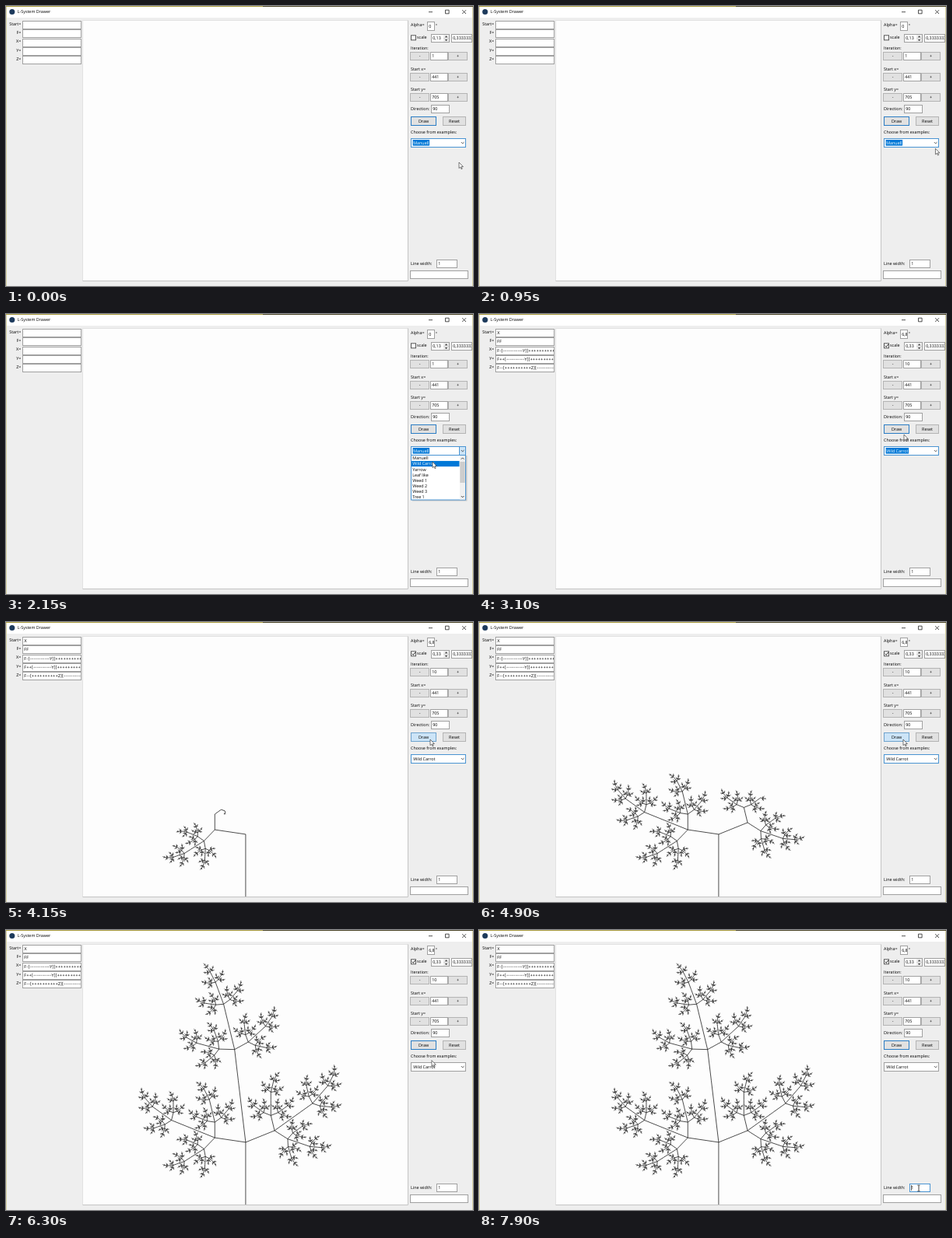
Write an HTML page with a canvas that moves like this. It is 600 px wide and 360 px high and loops after 8 s.

```html
<!DOCTYPE html>
<html lang="en">
<head>
<meta charset="utf-8">
<title>L-System Drawer</title>
<style>
  html, body { margin: 0; width: 100%; height: 100%; overflow: hidden; background: #eee; }
  canvas, body > svg { position: absolute; left: 0; top: 0; width: 600px; height: 360px; }
  text { font: 5.4px "Open Sans", "Noto Sans", sans-serif; fill: #000; white-space: pre;
    text-rendering: geometricPrecision; }
  .rule { font: 5.15px Inter, sans-serif; }
  .mid { text-anchor: middle; }
  .end { text-anchor: end; }
</style>
</head>
<body>
<canvas id="plant" width="600" height="360"></canvas>
<svg id="ui" viewBox="0 0 600 360"></svg>
<script>
const LOOP = 8000, STEP = 50;
const BLUE = '#0078d7', FOCUS = '#4a94d2', EDGE = '#a0a0a0';
const ui = document.getElementById('ui');

function add(tag, attrs, parent = ui, content = '') {
  const el = document.createElementNS('http://www.w3.org/2000/svg', tag);
  for (const key in attrs) el.setAttribute(key, attrs[key]);
  el.textContent = content;
  parent.append(el);
  return el;
}
const set = (el, attrs) => { for (const key in attrs) el.setAttribute(key, attrs[key]); };
const show = (el, on) => el.setAttribute('visibility', on ? 'visible' : 'hidden');
const write = (el, value) => { if (el.textContent !== value) el.textContent = value; };
const rect = (x, y, width, height, fill, stroke = 'none', parent = ui) =>
  add('rect', { x, y, width, height, fill, stroke }, parent);
const label = (x, y, value, cls = '', parent = ui) => add('text', { x, y, class: cls }, parent, value);
const line = (d, stroke = '#222', width = 0.8, parent = ui) =>
  add('path', { d, stroke, 'stroke-width': width, fill: 'none' }, parent);

function field(x, y, w, h, value, cls = '') {
  const box = rect(x + .5, y + .5, w - 1, h - 1, '#fff', EDGE);
  const inner = add('svg', { x: x + 1, y, width: w - 2, height: h });
  return { box, text: label(1.2, h / 2 + 1.5, value, cls, inner) };
}
function button(x, y, w, h, value) {
  const box = rect(x + .5, y + .5, w - 1, h - 1, '#e1e1e1', '#b4b4b4');
  label(x + w / 2, y + h / 2 + 1.8, value, 'mid');
  return box;
}
function stepper(y, value) {
  button(519, y, 25, 11, '-');
  button(568, y, 25, 11, '+');
  return field(545, y, 23, 11, value);
}

// Window frame and title bar
rect(0, 0, 600, 15, '#fff');
rect(0, 0, 330, 1, '#a89a3c');
rect(330, 0, 270, 1, '#4a4426');
rect(0, 1, 1, 359, '#d9d3a4');
rect(599, 1, 1, 359, '#d9d3a4');
add('circle', { cx: 7.8, cy: 7.5, r: 3.5, fill: '#1d3a5c' });
label(14.7, 9.4, 'L-System Drawer');
line('M543 7.7h5M564.5 5.2h4.6v4.6h-4.6zM586.2 5.2l4.8 4.8m0-4.8l-4.8 4.8');
line('M98.5 353.5V18.5H516.5', '#e2e2e2', 1);
line('M98.5 353.5H516.5V18.5', '#c4c4c4', 1);

// Left panel
const ruleText = ['Start', 'F', 'X', 'Y', 'Z'].map((name, i) => {
  const y = 19 + i * 11.3;
  label(19.3, y + 5.8, name + '=', 'end');
  return field(21, Math.round(y), 76, 11, '', 'rule').text;
});
const rules = ['X', 'FF',
  `F-[${'-'.repeat(11)}Y][${'+'.repeat(11)}Z]FX`,
  `F++[${'-'.repeat(10)}Y][${'+'.repeat(10)}Z]FY`,
  `F--[${'+'.repeat(10)}Z][${'-'.repeat(10)}Y]FZ`];

// Right panel
label(520, 26.1, 'Alpha=');
const alpha = field(541, 20, 10, 12, '0').text;
label(551.7, 26.6, '°');
rect(520.5, 37.8, 6, 6, '#fff', '#555');
const tick = line('M521.8 40.8l1.5 1.6 2.4-3.4', '#111', 0.9);
label(528, 42.3, 'scale');
const scale = field(546, 36, 24, 11, '').text;
rect(562, 37, 7, 9, '#ececec');
line('M562 41.5h7', '#c8c8c8', 0.7);
add('path', { d: 'M563.9 40.2h3.4l-1.7-2zM563.9 43h3.4l-1.7 2z', fill: '#333' });
field(572, 36, 27, 11, '0,3333333');
label(520, 56, 'Iteration:');
const iteration = stepper(59, '1').text;
label(520, 82.7, 'Start x=');
stepper(86, '441');
label(520, 109, 'Start y=');
stepper(112, '705');
label(520, 133.6, 'Direction:');
field(546, 127, 24, 11, '90');
const draw = button(520, 142, 33, 12, 'Draw');
button(561, 142, 30, 12, 'Reset');
label(520, 164.1, 'Choose from examples:');
const combo = rect(520.5, 170.5, 70, 11, '#fff', FOCUS);
const comboMark = rect(522.6, 172, 22, 7.6, BLUE);
const comboArrowBox = rect(582.5, 170.5, 8, 11, '#cce4f7', FOCUS);
line('M584.8 175l1.9 1.9 1.9-1.9', '#333');
const comboText = label(523.2, 177.6, 'Manuell');
label(520, 333.3, 'Line width:');
const widthField = field(553, 326, 27, 11, '1');
const caret = line('M555.5 328v7', '#222', 0.7);
field(519, 340, 75, 11, '');

// Dropdown list
const list = add('g', {});
rect(522, 182, 70.5, 58.5, '#c9c9c9', 'none', list);
rect(520.5, 181.5, 70, 57.5, '#fff', FOCUS, list);
const listMark = rect(521, 181.8, 61.5, 7.2, BLUE, 'none', list);
const items = ['Manuell', 'Wild Carrot', 'Yarrow', 'Leaf like', 'Weed 1', 'Weed 2', 'Weed 3', 'Tree 1']
  .map((name, i) => label(522.3, 187.3 + i * 7.13, name, '', list));
rect(583, 182, 7, 56.5, '#f0f0f0', 'none', list);
rect(583.3, 190, 6.4, 27, '#cdcdcd', 'none', list);
line('M584.8 186.7l1.8-1.8 1.8 1.8M584.8 234l1.8 1.8 1.8-1.8', '#333', 0.9, list);

// Pointers
const arrow = add('path', {
  d: 'M0 0V7.6L1.8 6 3 8.7 4.2 8.2 3 5.6H5.4Z', fill: '#fff', stroke: '#222', 'stroke-width': 0.6 });
const beam = line('M-1.6-3.8H-.3Q0-3.8 0-3.4V3.4Q0 3.8-.3 3.8H-1.6M1.6-3.8H.3M1.6 3.8H.3', '#111', 0.8);

// The plant: each symbol is [turn after the stem, first branch, its turn, second branch, its turn]
const ANGLE = 6.8, UNIT = 0.33 / 2.11;
const FINEST = 3; // levels below this are too small to see
const grammar = {
  X: [1, 'Y', 11, 'Z', -11],
  Y: [-2, 'Y', 10, 'Z', -10],
  Z: [2, 'Z', -10, 'Y', 10],
};
const segments = [];
function stem(x, y, dir, length) {
  const a = dir * Math.PI / 180;
  const end = [x + length * Math.cos(a), y - length * Math.sin(a)];
  segments.push([x, y, ...end]);
  return end;
}
function grow(symbol, level, x, y, dir) {
  if (level < FINEST) return;
  const [bend, first, turn1, second, turn2] = grammar[symbol];
  const length = UNIT * 2 ** (level - 1);
  [x, y] = stem(x, y, dir, length);
  dir += bend * ANGLE;
  grow(first, level - 1, x, y, dir + turn1 * ANGLE);
  grow(second, level - 1, x, y, dir + turn2 * ANGLE);
  grow(symbol, level - 1, ...stem(x, y, dir, length), dir);
}
grow('X', 10, 307.9, 353, 90);

const ctx = document.getElementById('plant').getContext('2d');
let drawn = -1;
function drawPlant(count) {
  if (count === drawn) return;
  if (count < drawn || drawn < 0) {
    ctx.fillStyle = '#fdfdfd';
    ctx.fillRect(99, 19, 417, 334);
    drawn = 0;
  }
  ctx.lineWidth = 0.7;
  ctx.strokeStyle = '#000';
  for (; drawn < count; drawn++) {
    const [x1, y1, x2, y2] = segments[drawn];
    ctx.beginPath();
    ctx.moveTo(x1, y1);
    ctx.lineTo(x2, y2);
    ctx.stroke();
  }
}

// Pointer path: time, x, y
const path = [
  [0, 582, 201], [650, 582, 201], [1100, 588, 177], [1550, 588, 177], [2100, 548, 190],
  [2750, 548, 190], [3100, 546, 155], [3350, 545, 151], [6150, 545, 151],
  [6950, 566, 331], [7350, 565, 332], [LOOP, 565, 332],
];
function pointerAt(t) {
  const i = path.findIndex(p => p[0] > t);
  const [t0, x0, y0] = path[i - 1], [t1, x1, y1] = path[i];
  const k = (t - t0) / (t1 - t0), e = k * k * (3 - 2 * k);
  return [x0 + (x1 - x0) * e, y0 + (y1 - y0) * e];
}

const DRAW_START = 3937, DRAW_TIME = 1889;

function render(t) {
  const [x, y] = pointerAt(t);
  const open = t >= 1200 && t < 2300;
  const chosen = t >= 2300;
  const done = t >= DRAW_START + DRAW_TIME;
  const pressed = t >= 3600 && !done;
  const overDraw = y < 153.5;
  const overWidth = y > 326;
  const typing = t >= 7350;

  set(arrow, { transform: `translate(${x} ${y})` });
  set(beam, { transform: `translate(${x} ${y})` });
  show(arrow, !overWidth);
  show(beam, overWidth);

  show(list, open);
  show(comboArrowBox, open || (t >= 1050 && t < 1200));
  const pick = open && y > 188.5 ? 1 : 0;
  set(listMark, { y: 181.8 + pick * 7.13 });
  items.forEach((item, i) => { item.style.fill = i === pick ? '#fff' : '#000'; });

  ruleText.forEach((el, i) => write(el, chosen ? rules[i] : ''));
  write(alpha, chosen ? '6,8' : '0');
  write(scale, chosen ? '0,33' : '0,13');
  write(iteration, chosen ? '10' : '1');
  write(comboText, chosen ? 'Wild Carrot' : 'Manuell');
  show(tick, chosen);

  const marked = t < 3600;
  show(comboMark, marked);
  set(comboMark, { width: chosen ? 29.5 : 21.5 });
  comboText.style.fill = marked ? '#fff' : '#000';
  set(combo, { stroke: done ? EDGE : FOCUS });

  set(draw, {
    fill: pressed ? '#cce4f7' : overDraw ? '#e5f1fb' : '#e1e1e1',
    stroke: pressed ? '#6fa3cd' : overDraw ? FOCUS : '#2a7cc4',
  });
  set(widthField.box, { stroke: typing ? FOCUS : overWidth ? '#555' : EDGE });
  show(caret, typing && (t < 7400 || t >= 7850));

  const progress = Math.min(1, Math.max(0, (t - DRAW_START) / DRAW_TIME));
  drawPlant(Math.round(progress * segments.length));
}

const start = performance.now();
function play() {
  const t = (performance.now() - start) % LOOP;
  render(Math.floor(t / STEP) * STEP);
  requestAnimationFrame(play);
}
play();
</script>
</body>
</html>
```
